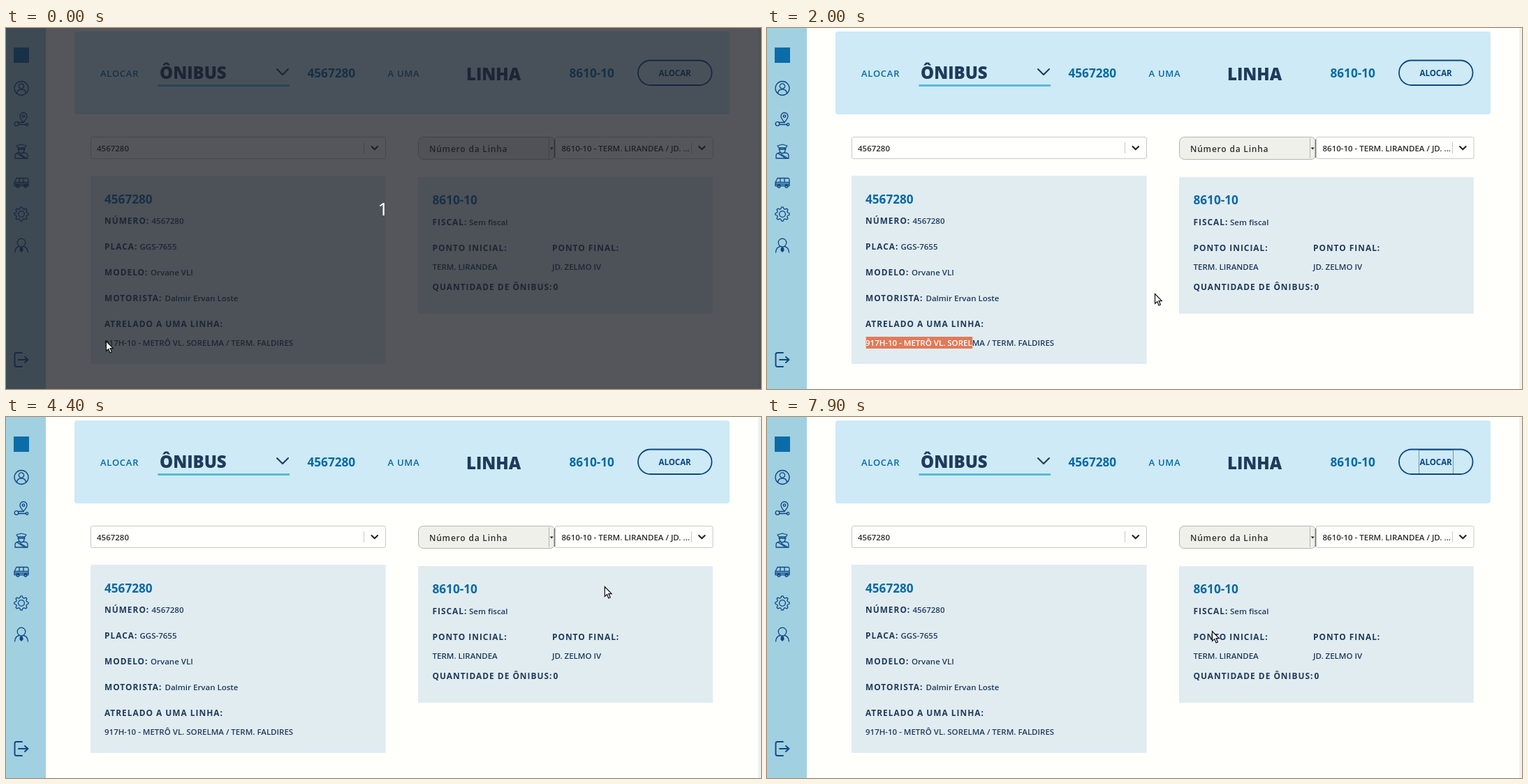
An HTML page that plays this animation: 1081x518 px, repeating every 8000 ms.

```html
<!DOCTYPE html>
<html lang="pt-BR">
<head>
<meta charset="utf-8">
<title>Alocar ônibus</title>
<style>
  html, body { margin: 0; width: 100%; height: 100%; overflow: hidden; background: #fffffb; }
  svg { display: block; width: 100%; height: 100%; }
  text { font: 600 11.5px "Open Sans", "Noto Sans", sans-serif; fill: #1f3a5c; }
  .label { font-weight: 700; font-size: 11.9px; letter-spacing: 1px; }
  .word { font-weight: 600; font-size: 13px; letter-spacing: .75px; fill: #0869a3; }
  .code { font-weight: 700; font-size: 17.2px; fill: #0869a3; }
  .big { font-weight: 800; font-size: 24px; }
  .button { font-weight: 700; font-size: 11.5px; fill: #0d4680; }
  .field { fill: #2b2b2b; }
  .native { font-weight: 600; font-size: 12px; letter-spacing: .8px; fill: #303030; }
  .white { fill: #fff; }
  .card { fill: #e1ecf1; }
  .box { fill: #fffffd; stroke: #c9c9c9; }
  .selection { fill: #e17a58; }
  .chevron { fill: none; stroke: #222; stroke-width: 2.1; stroke-linecap: round; stroke-linejoin: round; }
  .icon { fill: none; stroke: #0e4785; stroke-width: 1.3; stroke-linecap: round; stroke-linejoin: round; }
  .solid { fill: #0e4785; }
</style>
</head>
<body>
<svg viewBox="0 0 1081 518">
  <defs><clipPath id="selectedArea"><rect id="clipRect" x="141.5" y="443" height="18"/></clipPath></defs>
  <rect width="1081" height="518" fill="#fffffb"/>
  <rect x="1077" width="4" height="518" fill="#f0f0f0"/>

  <!-- Sidebar -->
  <rect width="57" height="518" fill="#a1d0e0"/>
  <rect x="11" y="28" width="22" height="22" fill="#0b6ca8"/>
  <g class="icon">
    <g transform="translate(22 86.5)">
      <circle r="10"/><circle cy="-3" r="3.6"/>
      <path d="M-6.5 7.3C-6 2.5-3 1.5 0 1.5S6 2.5 6.5 7.3"/>
    </g>
    <g transform="translate(22 131.5)">
      <path d="M3 4C0 0-2-2-2-5A5 5 0 0 1 8-5C8-2 6 0 3 4Z"/><circle cx="3" cy="-5" r="1.7"/>
      <path d="M3 4H-5M-4 7H7"/><circle cx="-7" cy="6" r="2.8"/><circle cx="8" cy="7" r="1.8"/>
    </g>
    <g transform="translate(22 177)">
      <path d="M-7-8L0-10 7-8 5-5H-5ZM-4-5V-1C-3 4 3 4 4-1V-5M-5-3H5M-9 10V6C-9 3-6 2-3 2M9 10V6C9 3 6 2 3 2M-9 10H9"/>
      <path d="M-6 3L5 10M-2 4L8 10"/>
    </g>
    <g transform="translate(22 221.5)">
      <path d="M-7-6H8C10-6 10-5 10-3V5H-10V0ZM-10 0H10M-3-6V0M3-6V0M-9 2.5H9"/>
      <circle cx="-5" cy="5.5" r="2"/><circle cx="6" cy="5.5" r="2"/>
    </g>
    <g transform="translate(22 267)"><path id="gear"/><circle r="4.4"/></g>
    <g transform="translate(22 312)">
      <circle cy="-4" r="5.8"/>
      <path d="M-9.5 10C-9 4-6 2-3 1.5M9.5 10C9 4 6 2 3 1.5"/>
      <path class="solid" d="M-1.2 3H1.2L2 7 0 9-2 7Z"/>
    </g>
    <path stroke-width="1.9" d="M23 466H15Q12.500 466 12.500 468.500V483.500Q12.500 486 15 486H23M18 476H31M27 472L31.500 476 27 480"/>
  </g>

  <!-- Header -->
  <rect x="98" y="5" width="938" height="119" rx="4" fill="#cdeaf6"/>
  <text class="word" x="135" y="69.5">ALOCAR</text>
  <text class="big" x="220" y="73">ÔNIBUS</text>
  <rect x="217.500" y="81" width="188.500" height="3" fill="#58b9de"/>
  <path class="chevron" d="M388 59l8 8 8-8" style="stroke:#1f3a5c"/>
  <text class="code" x="431.500" y="71">4567280</text>
  <text class="word" x="546.500" y="69.5">A UMA</text>
  <text class="big" x="659" y="74.500">LINHA</text>
  <text class="code" x="806.500" y="71">8610-10</text>
  <rect x="905" y="46.500" width="105.500" height="35.500" rx="17.750" fill="none" stroke="#0d4680" stroke-width="1.8"/>
  <text class="button" x="934.500" y="69">ALOCAR</text>
  <rect id="focus" x="933.500" y="47.500" width="49" height="34" fill="none" stroke="#0d4680" stroke-dasharray="1 1"/>

  <!-- Selects -->
  <rect class="box" x="121.500" y="156.500" width="422" height="31" rx="2.500"/>
  <path d="M512.500 164V180" stroke="#c9c9c9"/>
  <path class="chevron" d="M523.500 170l4.300 4.300 4.300-4.300"/>
  <text class="field" x="130" y="176.500">4567280</text>
  <rect x="590.500" y="156.500" width="195.500" height="32" rx="7" fill="#f0f0eb" stroke="#b4b4b2"/>
  <path d="M777.500 158V187" stroke="#b4b4b2"/>
  <path d="M785.300 160V186" stroke="#777" stroke-width="1.500"/>
  <path d="M778.700 171.500h5l-2.500 3z" fill="#222"/>
  <text class="native" x="606" y="178">Número da Linha</text>
  <rect class="box" x="786.500" y="156.500" width="225.500" height="31" rx="2.500"/>
  <path d="M981.500 164V180" stroke="#c9c9c9"/>
  <path class="chevron" d="M992 170l4.300 4.300 4.300-4.300"/>
  <text class="field" x="795.500" y="176.500">8610-10 - TERM. LIRANDEA / JD. ...</text>

  <!-- Bus card -->
  <rect class="card" x="121" y="212" width="422.500" height="270"/>
  <text class="code" x="141" y="251.500">4567280</text>
  <text class="label" x="141" y="281">NÚMERO:</text><text x="208.500" y="281">4567280</text>
  <text class="label" x="141" y="318">PLACA:</text><text x="191.500" y="318">GGS-7655</text>
  <text class="label" x="141" y="355">MODELO:</text><text x="207" y="355">Orvane VLI</text>
  <text class="label" x="141" y="392">MOTORISTA:</text><text x="227.500" y="392">Dalmir Ervan Loste</text>
  <text class="label" x="141" y="428.500">ATRELADO A UMA LINHA:</text>
  <text id="route" x="141" y="455.700">917H-10 - METRÔ VL. SORELMA / TERM. FALDIRES</text>
  <g clip-path="url(#selectedArea)">
    <rect class="selection" x="141.500" y="443" width="402" height="17"/>
    <text id="routeSelected" class="white" x="141" y="455.700"></text>
  </g>

  <!-- Line card -->
  <rect class="card" x="590" y="214" width="422" height="196"/>
  <text class="code" x="610.500" y="253">8610-10</text>
  <text class="label" x="610.500" y="283">FISCAL:</text><text x="663" y="283">Sem fiscal</text>
  <text class="label" x="610.500" y="319.500">PONTO INICIAL:</text><text x="610.500" y="347">TERM. LIRANDEA</text>
  <text class="label" x="782" y="319.500">PONTO FINAL:</text><text x="782" y="347">JD. ZELMO IV</text>
  <text class="label" x="610.500" y="376">QUANTIDADE DE ÔNIBUS:</text>
  <text class="label" x="783.500" y="376">0</text>
  <g id="zeroSelected">
    <rect class="selection" x="780" y="362.500" width="12" height="18"/>
    <text class="label white" x="783.500" y="376">0</text>
  </g>

  <g id="countdown">
    <rect width="1081" height="518" fill="#1c1e26" fill-opacity=".75"/>
    <text class="white" x="540" y="269" text-anchor="middle" style="font:400 26px 'Noto Sans',sans-serif">1</text>
  </g>

  <path id="arrow" d="M.5.5V14.500L3.800 11.500 6 17 8.400 16 6.100 10.600H10.300Z" fill="#fff" stroke="#111" stroke-width="1.200"/>
  <g id="beam" fill="none" stroke-linecap="square">
    <path d="M-2-6H2M0-6V6M-2 6H2" stroke="#fff" stroke-width="3.200"/>
    <path d="M-2-6H2M0-6V6M-2 6H2" stroke="#111" stroke-width="1.400"/>
  </g>
</svg>
<script>
const LOOP = 8000, STEP = 100;
const el = id => document.getElementById(id);
const show = (id, on) => el(id).setAttribute('visibility', on ? 'visible' : 'hidden');

// Each move: start, end, x, y, pointer shape
const moves = [
  [-100, 0, 143, 449, 'arrow'],
  [0, 100, 145, 452, 'beam'],
  [500, 1000, 235.5, 455, 'beam'],
  [1100, 1600, 300, 446, 'beam'],
  [1700, 2000, 555, 381, 'arrow'],
  [2000, 2300, 735, 357, 'arrow'],
  [2300, 2500, 777, 355, 'arrow'],
  [2500, 2600, 781.5, 359, 'beam'],
  [2600, 2900, 782, 371, 'beam'],
  [3000, 3300, 789, 372, 'beam'],
  [3300, 3400, 791, 369, 'arrow'],
  [3900, 4000, 794, 369, 'arrow'],
  [4200, 4700, 951, 54, 'arrow'],
  [5100, 5200, 817, 150, 'arrow'],
  [5200, 5300, 683.5, 259, 'beam'],
  [5400, 5500, 639.5, 284, 'beam'],
  [5600, 5700, 631, 285, 'arrow'],
  [6500, 6600, 636, 300, 'arrow'],
  [6600, 6700, 635, 301, 'arrow'],
  [7000, 7100, 639.5, 310, 'beam'],
  [7300, 7400, 639.5, 311, 'beam'],
  [7800, 7900, 637, 307, 'arrow']
];

const progress = (t, start, end) => Math.min(1, Math.max(0, (t - start) / (end - start)));

function pointerAt(t) {
  let x = 0, y = 0, shape = 'arrow';
  for (const [start, end, toX, toY, nextShape] of moves) {
    if (t <= start) break;
    const p = progress(t, start, end);
    x += (toX - x) * p;
    y += (toY - y) * p;
    shape = nextShape;
  }
  return { x, y, shape };
}

function gearPath(teeth, inner, outer) {
  const points = [];
  for (let i = 0; i < teeth * 4; i++) {
    const radius = i % 4 < 2 ? outer : inner;
    const angle = (i - 0.5) * Math.PI / (teeth * 2);
    points.push(`${radius * Math.cos(angle)} ${radius * Math.sin(angle)}`);
  }
  return `M${points.join('L')}Z`;
}

function draw() {
  const t = Math.floor(performance.now() % LOOP / STEP) * STEP;

  const chars = t < 3000
    ? Math.round(15 * progress(t, 500, 1000) + 10 * progress(t, 1100, 1600)) : 0;
  const width = chars ? el('route').getSubStringLength(0, chars) : 0;
  el('clipRect').setAttribute('width', width);

  show('zeroSelected', t >= 3200 && t < 4300);
  show('focus', t >= 4900);
  show('countdown', t < 100);

  const { x, y, shape } = pointerAt(t);
  for (const id of ['arrow', 'beam']) {
    show(id, id === shape);
    el(id).setAttribute('transform', `translate(${x} ${y})`);
  }
  requestAnimationFrame(draw);
}

el('gear').setAttribute('d', gearPath(8, 7.8, 10.2));
el('routeSelected').textContent = el('route').textContent;
draw();
</script>
</body>
</html>
```
